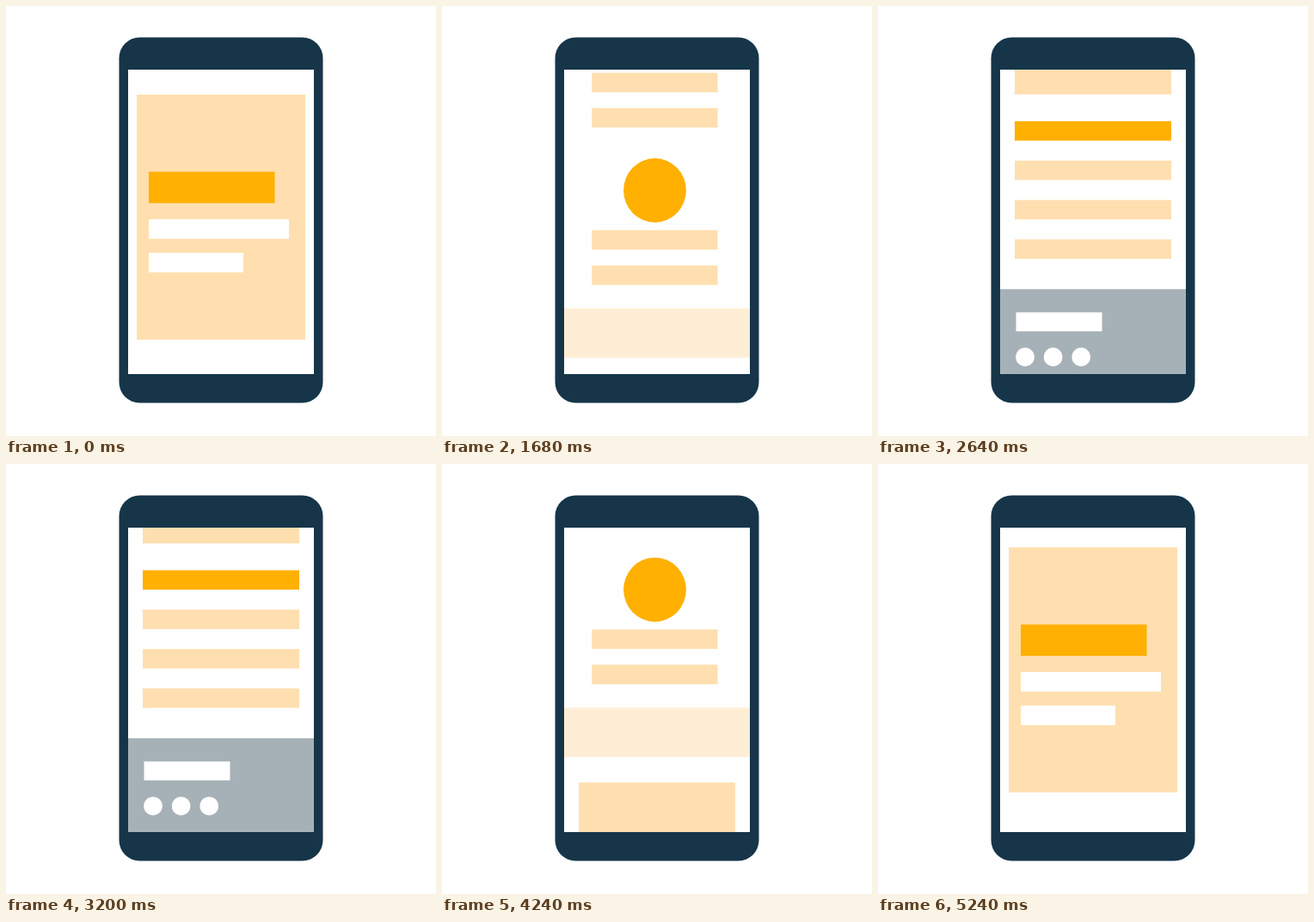
Recreate the animation shown at these times as an HTML page with a canvas. Size 500 by 500 pixels, loop 5.28 s.

```html
<!DOCTYPE html>
<html lang="en">
<head>
<meta charset="utf-8">
<title>Scrolling phone page</title>
<style>
  html, body { margin: 0; width: 100%; height: 100%; overflow: hidden; background: #fff; }
  canvas { display: block; width: 500px; height: 500px; }
</style>
</head>
<body>
<canvas id="stage" width="500" height="500"></canvas>
<script>
const ctx = document.getElementById('stage').getContext('2d');
const LOOP = 5280, STEP = 40, DEPTH = 1119;
const NAVY = '#163549', AMBER = '#ffb000', PEACH = '#ffdfb0',
      CREAM = '#ffeed6', GREY = '#a6b1b7', WHITE = '#fff';

function box(x, y, right, h, color) {
  ctx.fillStyle = color;
  ctx.fillRect(x, y, right - x, h);
}

function oval(x, y, rx, ry, color) {
  ctx.fillStyle = color;
  ctx.beginPath();
  ctx.ellipse(x, y, rx, ry, 0, 0, Math.PI * 2);
  ctx.fill();
}

// Height above the page bottom, 0 to 1, for a time fraction measured from the bottom
function ease(x) {
  let lo = 0, hi = 1;
  for (let i = 0; i < 40; i++) {
    const u = (lo + hi) / 2, v = 1 - u;
    const at = 3 * 0.727 * u * v * v + 3 * 0.453 * u * u * v + u * u * u;
    if (at < x) lo = u; else hi = u;
  }
  return lo * lo * (3 - 2 * lo);
}

function scrollAt(t) {
  if (t < 640) return 0;
  const rise = t < 3000 ? (2971 - t) / 2383 : (t - 3000) / 2400;
  return DEPTH * (1 - ease(Math.max(0, rise)));
}

function drawPage() {
  // Hero
  box(152, 103, 348, 285, PEACH);
  box(166, 192.7, 312.5, 36.5, AMBER);
  box(166, 248, 329, 22.7, WHITE);
  box(166, 287, 276, 22.7, WHITE);

  // Feature list
  for (let i = 0; i < 3; i++) {
    const y = 484.7 + i * 183;
    oval(247.5, y, 36.4, 37.3, AMBER);
    box(174.3, y + 46.3, 320.6, 22.7, PEACH);
    box(174.3, y + 87.3, 320.6, 22.7, PEACH);
  }
  box(142, 988, 358, 57.3, CREAM);

  // Article
  box(159, 1075, 341, 131, PEACH);
  for (let i = 0; i < 4; i++)
    box(159, 1237.2 + i * 45.8, 341, 22.6, i ? PEACH : AMBER);

  // Footer
  box(142, 1432.5, 358, 130, GREY);
  box(160.5, 1459.5, 260.5, 22, WHITE);
  for (let i = 0; i < 3; i++) oval(171 + i * 32.6, 1511.4, 10.8, 10.8, WHITE);
}

function draw(t) {
  box(0, 0, 500, 500, WHITE);
  ctx.fillStyle = NAVY;
  ctx.beginPath();
  ctx.roundRect(131.5, 36.5, 237, 425, 24);
  ctx.fill();

  ctx.save();
  ctx.beginPath();
  ctx.rect(142, 74, 216, 354);
  ctx.clip();
  box(142, 74, 358, 354, WHITE);
  ctx.translate(0, -scrollAt(t));
  drawPage();
  ctx.restore();
}

const start = performance.now();
function tick() {
  const t = (performance.now() - start) % LOOP;
  draw(Math.floor(t / STEP) * STEP);
  requestAnimationFrame(tick);
}
tick();
</script>
</body>
</html>
```
